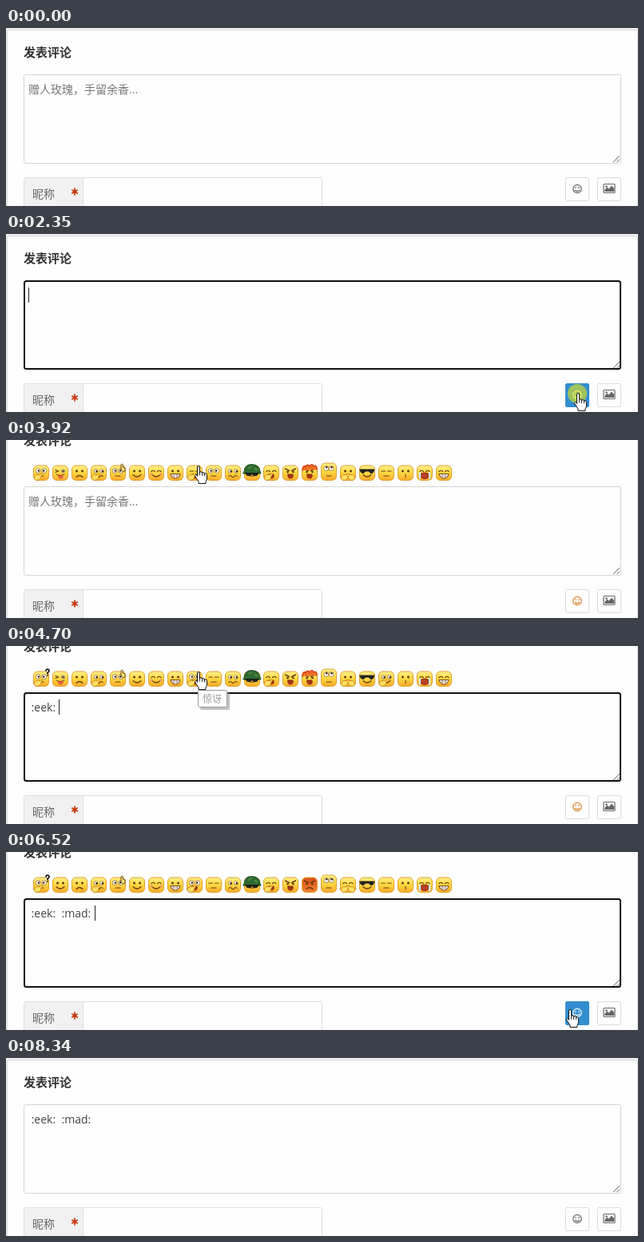
Recreate the animation shown at these times as an HTML page. Size 791 by 223 pixels, loop 8.84 s.

```html
<!DOCTYPE html>
<html lang="zh">
<head>
<meta charset="utf-8">
<style>
  html, body { margin: 0; width: 100%; height: 100%; overflow: hidden; background: #fefefe; }
  svg { display: block; }
  text { font-family: "Open Sans", "Noto Sans CJK SC", "Noto Sans CJK", sans-serif; white-space: pre; }
</style>
</head>
<body>
<svg id="stage" width="791" height="223" viewBox="0 0 791 223">
  <defs>
    <linearGradient id="skin" x2="0" y2="1">
      <stop offset="0" stop-color="#fff08a"/><stop offset=".5" stop-color="#ffd840"/><stop offset="1" stop-color="#f6a92a"/>
    </linearGradient>
    <linearGradient id="fire" x2="0" y2="1">
      <stop offset="0" stop-color="#d8501c"/><stop offset="1" stop-color="#f0812c"/>
    </linearGradient>
  </defs>
  <rect width="791" height="223" fill="#f0f0f0"/>
  <g id="top">
    <rect x="1.5" y="2.5" width="789" height="300" rx="2" fill="#fefefe" stroke="#dadada"/>
    <text x="22" y="36" font-size="15" font-weight="700" fill="#333">发表评论</text>
  </g>
  <g id="panel"></g>
  <rect id="area" fill="#fefefe"/>
  <path d="M760 168l8-8M764.5 168l3.500-3.500" stroke="#666" fill="none"/>
  <text id="words" x="28" y="82" font-size="14"></text>
  <path id="caret" stroke="#222"/>
  <rect x="22.500" y="187.500" width="373" height="60" rx="2" fill="#fefefe" stroke="#ddd"/>
  <path d="M23 188h73v40h-73z" fill="#f1f1f1"/><path d="M96.500 188v40" stroke="#ddd"/>
  <text x="33" y="212.500" font-size="14" fill="#666">昵称</text>
  <path d="M86 200.500v9M82.200 202.800l7.600 4.400M89.800 202.800l-7.600 4.400" stroke="#c63a10" stroke-width="1.900"/>
  <rect id="btn" x="700.500" y="187.500" width="29" height="29" rx="1.500"/>
  <g id="smile" fill="none">
    <circle cx="715" cy="201.500" r="5.200" stroke-width="1.200"/>
    <path d="M713 199v2M717 199v2M712 203q3 3.200 6 0" stroke-width="1.200"/>
  </g>
  <rect x="740.500" y="187.500" width="29" height="29" rx="1.500" fill="#fefefe" stroke="#ddd"/>
  <rect x="748" y="195.500" width="14" height="11" rx="1" fill="none" stroke="#666" stroke-width="1.200"/>
  <path d="M749.500 205v-2.500l3-3 2 2 3.500-4 3 3.500v4z" fill="#666"/><circle cx="751.500" cy="198.500" r="1.300" fill="#666"/>
  <g id="over"></g>
</svg>
<script>
const $ = id => document.getElementById(id);
const set = (el, attrs) => { for (const k in attrs) el.setAttribute(k, attrs[k]); };
const line = (d, w = 1.2, c = '#6b3a0c', fill = 'none') =>
  `<path d="${d}" stroke="${c}" stroke-width="${w}" fill="${fill}" stroke-linecap="round"/>`;
const dot = (x, y, r, c) => `<circle cx="${x}" cy="${y}" r="${r}" fill="${c}"/>`;
const ball = (x, y, r, px, py) =>
  `<circle cx="${x}" cy="${y}" r="${r}" fill="#fff" stroke="#9a6a20" stroke-width=".8"/>` + dot(x + px, y + py, 1.2, '#3a2008');

const eyes = {
  dots: dot(-3.5, -2, 1.4, '#5a300a') + dot(3.5, -2, 1.4, '#5a300a'),
  wide: ball(-3.8, -2.5, 3, .6, 0) + ball(3.8, -2.5, 3, -.6, 0),
  up: ball(-3.2, -5.5, 3, .4, -1.2) + ball(3.2, -5.5, 3, .4, -1.2),
  side: ball(-3.5, -2, 2.4, 1, .3) + ball(3.8, -2, 2.4, 1, .3),
  shut: line('M-6-1.500q2.200-2.500 4.400 0M1.600-1.500q2.200-2.500 4.400 0'),
  flat: line('M-6-2h4.500M1.500-2h4.500'),
  wink: line('M-6-3.500l3.500 1.500-3.500 1.500') + ball(3.5, -2, 2.2, 0, 0),
  mad: line('M-6.500-5l5 2.500M6.500-5l-5 2.500', 1.5) + dot(-3.5, -1, 1.3, '#5a300a') + dot(3.5, -1, 1.3, '#5a300a'),
  shades: line('M-9-4h18l-1.500 3.500q-3 2.500-5.500-1.500h-4q-2.500 4-5.500 1.500z', 1, '#222', '#222')
};
const mouths = {
  none: '',
  smile: line('M-5 2.500q5 5 10 0'),
  frown: line('M-4 5.500q4-4 8 0'),
  flat: line('M-3 4h6'),
  wave: line('M-5 4.500q1.700-2.500 3.400 0t3.400 0 3.400 0'),
  kiss: line('M-.5 2q2.500 1 .3 2 2.200 1 0 2.200', 1),
  open: line('M-3 2h6q1 5-3 5t-3-5z', 1, '#8a2a10', '#a8361a'),
  wail: line('M-4.500 1q4.500-2 9 0v5q-4.500 3-9 0z', 1, '#8a2a10', '#b8402a'),
  grin: line('M-6 1.500h12q-1 5.500-6 5.500t-6-5.500z', 1, '#7a4410', '#fff') + line('M-5 4h10M-2 2v4.500M2 2v4.500', .5),
  tongue: line('M-5 2q5 3 10 0', 1) + line('M-2 3.500h5v2q-2.500 3.500-5 0z', .8, '#c43a2a', '#ef6550')
};
const hand = line('M-9 5q3-4 7-2.500l3-1.500q2 1-1 3 0 5-5 5.500-4 0-4-4.500z', .9, '#c98518', '#ffdf62');
const extras = {
  hand,
  hands: hand + `<g transform="scale(-1,1)">${hand}</g>`,
  blush: dot(-6, 2, 1.8, '#f59a62') + dot(6, 2, 1.8, '#f59a62'),
  finger: line('M4-4v-6q1.200-2 2.400 0v3l2.500 1v4q-3 2-5-2z', .9, '#5a3a14', '#ffe47a'),
  ask: hand + line('M6-10q1-3 3.500-1.500 1.500 2-1.500 4v1M8-4.500v.3', 1.7, '#111'),
  tears: line('M-6 0v7M6 0v7', 2.2, '#cfeaf8'),
  helmet: line('M-10-2q1-9 10-8.500t10 8.500l1 3h-22z', .8, '#123d1c', '#2d6b32') +
    line('M-8 .5h16l-2 3h-4l-2-2-2 2h-4z', .8, '#111', '#222') + line('M-4-6l3-2M3-5l3 1', 1.5, '#6b9446'),
  flames: line('M-9-3q1-8 4-4 2-5 5-1 3-5 5 0 4-3 4 4', 1.4, '#d8401a', '#ee7326')
};

// Each face: [eyes, mouth, extra], optional [period, phases, variant]
const faces = [
  ['wide flat hand', 7, [4], 'wide flat ask'],
  ['wink tongue', 3, [1], 'dots smile'],
  ['dots frown'],
  ['side wave hand'],
  ['wide flat finger'],
  ['dots smile'],
  ['shut smile blush'],
  ['dots grin'],
  ['wide open hand', 7, [1], 'flat open hand'],
  ['wide flat', 7, [4], 'flat flat'],
  ['side wave'],
  ['dots flat helmet'],
  ['shut open hand'],
  ['mad open', 4, [0], 'mad frown'],
  ['mad open flames', 3, [1, 2], 'mad frown red'],
  ['up flat'],
  ['shut none hands', 4, [2, 3], 'dots flat hands'],
  ['shades smile'],
  ['flat flat', 5, [3, 4], 'side smile hand'],
  ['dots kiss'],
  ['shut wail tears'],
  ['shut grin']
];

function face([base, period, phases, alt], i, step) {
  const [e, m, x] = (phases && phases.includes(step % period) ? alt : base).split(' ');
  const high = e === 'up' ? 3 : 0;
  return `<g transform="translate(${44 + i * 24},41)">
    <rect x="-9.500" y="${-9 - high}" width="19" height="${18.5 + high}" rx="5" fill="url(#${x === 'red' ? 'fire' : 'skin'})" stroke="#e0a02c"/>
    ${eyes[e]}${mouths[m]}${extras[x] || ''}</g>`;
}

const shapes = {
  arrow: line('M0 0v16l3.700-3.500 2.400 5.700 2.500-1-2.400-5.600h5z', 1, '#222', '#fff'),
  beam: line('M-3-7.500h2l1 1 1-1h2M0-6.500v13M-3 7.500h2l1-1 1 1h2', 1, '#222'),
  hand: line('M-1.500 12V1a1.500 1.500 0 0 1 3 0V7q3-1 3 1 3-1 3 1 3-.8 3 1.500V15q0 2-1.500 4v2.500H0V19l-4-6q-1-2 .5-2.500 1-.3 2 1.500z', 1, '#111', '#fff') +
    line('M1.500 7v4M4.500 8v3.500M7.500 9v3', .9, '#111')
};

// First step of each pose: shape, x, y, then click ring or tooltip
const poses = [
  [0], [1, 'arrow', 576, 178], [2, 'beam', 537, 130], [4, 'beam', 537, 130, 1], [5, 'beam', 537, 130],
  [6, 'beam', 590, 150], [7, 'arrow', 668, 184], [8, 'hand', 716, 200], [9, 'hand', 716, 200, 1], [10, 'hand', 716, 200],
  [13, 'beam', 520, 130], [14, 'hand', 300, 40], [15, 'hand', 241, 33], [16, 'hand', 241, 33, 1],
  [17, 'hand', 241, 33, '惊讶'], [19, 'hand', 262, 36], [20, 'hand', 340, 38], [21, 'hand', 362, 38, 1],
  [22, 'hand', 362, 38, '咒骂'], [23, 'beam', 520, 110], [24, 'arrow', 701, 194], [25, 'hand', 706, 198],
  [26, 'hand', 706, 198, 1], [27, 'hand', 706, 198], [31, 'arrow', 662, 204], [32]
];
const slide = { 10: -1900, 11: -430, 12: 33, 13: -8, 28: 10, 29: 20, 30: -500 };
const within = (n, a, b) => n >= a && n <= b;

function pointer([, shape, x, y, note]) {
  if (!shape) return '';
  const ring = note === 1 ? `<circle cx="${x - 1}" cy="${y}" r="12" fill="#d8e020" fill-opacity=".65"/>` : '';
  const tip = note && note !== 1 ? `<g transform="translate(${x - 1},${y + 22})">
    <rect x="3" y="3" width="37" height="22" rx="2" fill="#888" opacity=".5"/>
    <rect x=".5" y=".5" width="36" height="21" rx="2" fill="#fff" stroke="#999"/>
    <text x="6" y="15.500" font-size="12" fill="#999">${note}</text></g>` : '';
  return `${ring}${tip}<g transform="translate(${x},${y})">${shapes[shape]}</g>`;
}

function draw(step) {
  const open = within(step, 10, 30);
  const focus = within(step, 4, 9) || within(step, 17, 25);
  const hover = within(step, 8, 12) || within(step, 25, 30);
  const typed = step < 17 ? '' : step < 22 ? ' :eek: ' : ' :eek:  :mad: ';

  set($('top'), { transform: `translate(0,${open ? -30 : 0})` });
  $('panel').innerHTML = open ? faces.map((f, i) => face(f, i, step)).join('') : '';
  set($('panel'), { transform: `translate(${slide[step] || 0},0)` });
  set($('area'), focus
    ? { x: 23, y: 59, width: 746, height: 110, rx: 2.5, stroke: '#111', 'stroke-width': 2 }
    : { x: 22.5, y: 58.5, width: 747, height: 111, rx: 2, stroke: '#d5d5d5', 'stroke-width': 1 });
  $('words').textContent = typed || (focus ? '' : '赠人玫瑰，手留余香...');
  set($('words'), { fill: typed ? '#444' : '#777' });

  const blink = [4, 5, 8, 9, 17, 18, 21, 22, 25].includes(step);
  const cx = step < 17 ? 28.5 : step < 22 ? 66.5 : 111.5;
  set($('caret'), { d: blink ? `M${cx} 67v19` : '' });
  set($('btn'), { fill: hover ? '#338ecf' : '#fefefe', stroke: hover ? '#338ecf' : '#ddd' });
  set($('smile'), { stroke: hover ? '#fff' : open ? '#d9822b' : '#666' });
  $('over').innerHTML = pointer(poses.filter(p => p[0] <= step).pop());
}

const LOOP = 8840, STEPS = 33;
const startOf = n => n * 260 + 10 * ((n >= 4) + (n >= 10));
const start = performance.now();
let shown = -1;
function tick() {
  const t = Math.max(0, performance.now() - start) % LOOP;
  let step = STEPS - 1;
  while (step && startOf(step) > t) step--;
  if (step !== shown) draw(shown = step);
  requestAnimationFrame(tick);
}
tick();
</script>
</body>
</html>
```
